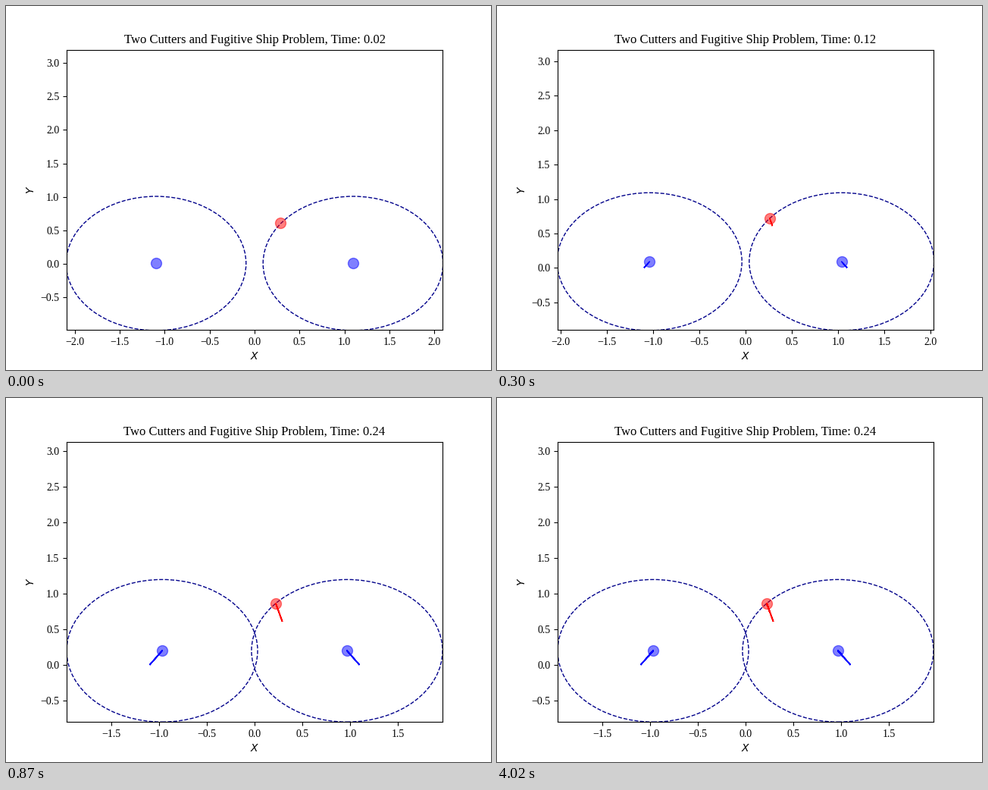
Animation of 640x480 px, one loop 4.51 s. Source, as a matplotlib script:

```python
import numpy as np
import matplotlib.pyplot as plt
from matplotlib.animation import FuncAnimation
from matplotlib.collections import PathCollection
from matplotlib.patches import Circle
from matplotlib.path import Path

plt.rcParams["font.family"] = "Liberation Serif"

TICK = 10          # ms per animation frame
LOOP = 4510        # ms per loop
STEP = 30          # ms per simulation step
LAST_STEP = 134
T_END, DT = 0.24, 0.01
TAIL = 0.09        # time span of the tail stroked at each step

# start and velocity: left cutter, right cutter, fugitive
START = np.array([[-1.1, 0.0], [1.1, 0.0], [0.2915, 0.6075]])
SPEED = np.array([[0.55, 0.835], [-0.55, 0.835], [-0.284, 1.05]])
COLORS = ["blue", "blue", "red"]


def time_at(step):
    return min(DT * (step + 1), T_END)


def ships_at(t):
    return START + SPEED * t


def tails_at(step):
    t = time_at(step)
    a, b = ships_at(max(DT, t - TAIL)), ships_at(t)
    return [Path([p, q]) for p, q in zip(a, b)]


# tails pile up on the canvas, one stroke per ship and step
strokes = [path for k in range(1, LAST_STEP + 1) for path in tails_at(k)]

fig, ax = plt.subplots(figsize=(6.4, 4.8), dpi=100)
ax.set_xlabel("$X$")
ax.set_ylabel("$Y$")
title = ax.set_title("", y=1.0)

rings = [ax.add_patch(Circle((0, 0), 1, fill=False, ls="--", lw=1,
                             color="darkblue")) for _ in range(2)]
dots = [ax.plot([], [], "o", ms=10, color=c, alpha=0.5)[0] for c in COLORS]
trails = PathCollection([], facecolors="none", edgecolors=COLORS,
                        linewidths=1, capstyle="projecting", zorder=3)
ax.add_collection(trails, autolim=False)


def update(i):
    step = min(i * TICK // STEP, LAST_STEP)
    ships = ships_at(time_at(step))
    for dot, (x, y) in zip(dots, ships):
        dot.set_data([x], [y])
    for ring, pos in zip(rings, ships):
        ring.set_center(pos)
    trails.set_paths(strokes[:3 * step])

    # title and view run one step ahead of the ships
    ahead = time_at(step + 1)
    (x0, y0), (x1, _), _ = ships_at(ahead)
    left, right, low = x0 - 1, x1 + 1, y0 - 1
    ax.set_xlim(left, right)
    ax.set_ylim(low, low + right - left)
    title.set_text(f"Two Cutters and Fugitive Ship Problem, Time: {ahead:.2f}")
    return []


anim = FuncAnimation(fig, update, frames=LOOP // TICK, interval=TICK,
                     repeat=True, repeat_delay=0, cache_frame_data=False)
plt.show()
```
